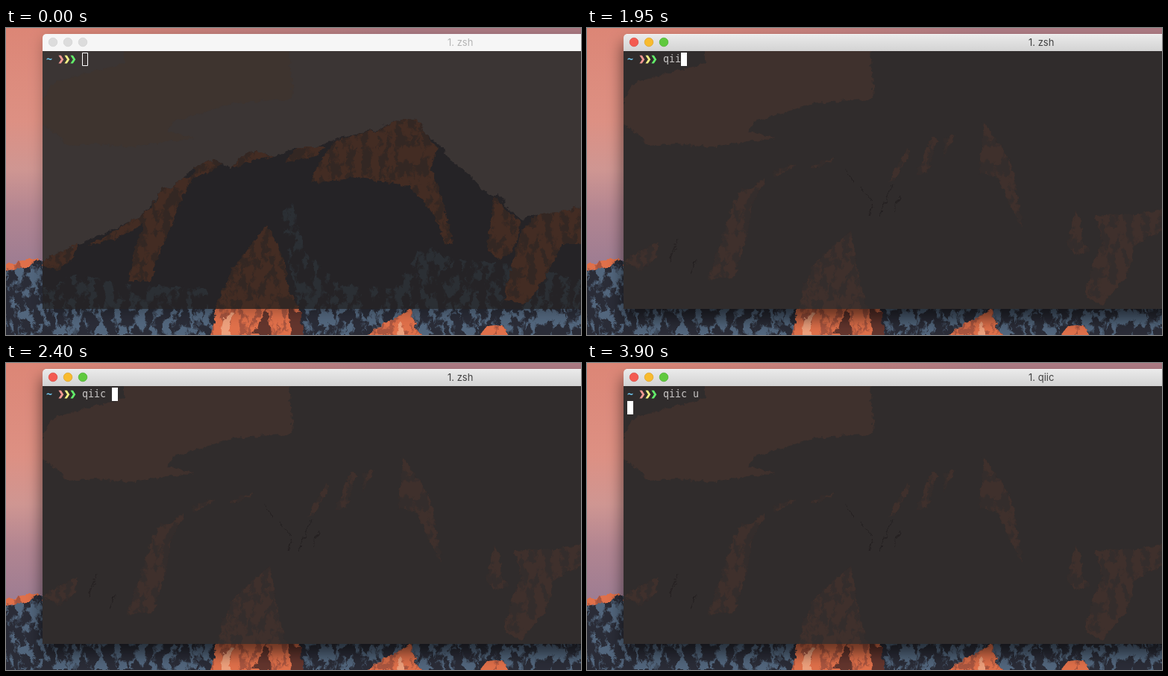
These frames come from a looping animation (771x412 px, 8 s). An HTML page:

```html
<!DOCTYPE html>
<html lang="en">
<head>
<meta charset="utf-8">
<title>Terminal</title>
<style>
  html, body { margin: 0; width: 100%; height: 100%; overflow: hidden; background: #a77c84; }
  svg { display: block; width: 771px; height: 412px; }
  .mono { font: 13.29px "DejaVu Sans Mono", monospace; white-space: pre; }
  .title { font: 13px Inter, sans-serif; }
  .chevron { stroke: currentColor; fill: currentColor; stroke-width: 1; }
  .rock { filter: url(#rough); }
  .flecks { filter: url(#flecks); }
  .focused .idle, .blurred .active { display: none; }
</style>
</head>
<body>
<svg id="stage" class="blurred" viewBox="0 0 771 412">
  <defs>
    <linearGradient id="sky" x2="0" y2="1">
      <stop offset="0" stop-color="#dc8676"/>
      <stop offset=".3" stop-color="#dd9083"/>
      <stop offset=".46" stop-color="#cf9692"/>
      <stop offset=".6" stop-color="#b28591"/>
      <stop offset=".78" stop-color="#9c7c92"/>
    </linearGradient>
    <linearGradient id="dusk">
      <stop offset=".1" stop-color="#ad7b84" stop-opacity="0"/>
      <stop offset=".7" stop-color="#ad7b84"/>
    </linearGradient>
    <linearGradient id="bar" x2="0" y2="1">
      <stop offset="0" stop-color="#ebebeb"/>
      <stop offset="1" stop-color="#d3d3d3"/>
    </linearGradient>
    <filter id="rough" filterUnits="userSpaceOnUse" x="0" y="0" width="771" height="412" color-interpolation-filters="sRGB">
      <feTurbulence type="fractalNoise" baseFrequency=".12" numOctaves="3" seed="4"/>
      <feDisplacementMap in="SourceGraphic" scale="9" xChannelSelector="R" yChannelSelector="G"/>
    </filter>
    <filter id="flecks" filterUnits="userSpaceOnUse" x="0" y="0" width="771" height="412" color-interpolation-filters="sRGB">
      <feTurbulence type="fractalNoise" baseFrequency=".09 .05" numOctaves="4" seed="9"/>
      <feColorMatrix values="0 0 0 0 0  0 0 0 0 0  0 0 0 0 0  9 0 0 0 -4.3"/>
      <feComposite in="SourceGraphic" operator="in"/>
    </filter>
    <filter id="blur" filterUnits="userSpaceOnUse" x="-60" y="-60" width="960" height="560">
      <feGaussianBlur stdDeviation="10"/>
    </filter>
    <clipPath id="screen"><path d="M49 31H771V377H49Z"/></clipPath>

    <path id="ridge" d="M-9 322L10 325 25 312 49 312 75 300 110 285 150 268 175 255 195 240 210 212
      220 215 238 202 252 187 280 175 302 190 320 168 335 166 360 172 390 160 412 162 440 150
      470 142 500 135 525 124 540 121 552 124 565 145 580 155 600 180 625 200 645 224 660 224
      672 240 690 258 712 250 720 260 740 247 780 239V421H-9Z"/>
    <path id="slopes" d="M368 250L385 235 400 300 450 345 520 350 560 290 600 310 690 320 780 340V421H400Z
      M60 350L90 330 160 345 270 350 270 421H-9V340Z"/>
    <g id="faces">
      <path d="M540 121L552 124 565 145 578 160 570 190 585 230 600 290 590 290 575 255 560 232
        540 212 500 205 470 200 440 205 410 207 420 180 440 152 470 143 500 136 525 124Z"/>
      <path d="M210 212L220 215 238 202 252 198 235 230 222 265 200 315 195 340 165 340 172 300 185 262 150 282 110 292 150 270 195 242Z"/>
      <path d="M252 187L280 175 290 183 270 196 252 200Z M302 190L320 168 335 166 360 172 330 178Z
        M390 160L428 160 415 172 375 180Z"/>
      <path d="M350 265L362 285 375 320 378 350 395 380 395 421H275L282 370 300 330 325 295Z"/>
      <path d="M655 225L672 245 690 262 680 300 660 310 645 298Z
        M690 275L712 250 740 247 780 239V290L745 290 725 330 700 370 668 365 680 310Z"/>
      <path d="M49 312L75 300 97 288 90 310 70 325 50 320Z M-9 321L25 311 46 311 28 321-9 327Z"/>
      <path d="M543 377L548 400 562 421H470L505 398Z M628 421L645 400 665 398 678 421Z"/>
    </g>
    <g id="glow">
      <path d="M158 22H380L384 95 340 98 300 102 250 118 225 125 215 138 255 148 160 160 120 155 85 158 65 140 40 122 60 75 110 60 158 48Z"/>
    </g>
    <g id="highlights">
      <path d="M532 126L548 150 568 178 574 210 584 268 570 245 552 200 525 196Z
        M462 146L470 148 455 195 442 197Z M480 148L494 143 478 172Z M430 160L434 165 412 205 406 205Z"/>
      <path d="M208 214L214 218 240 202 222 235 212 290 196 335 162 338 175 300 195 240Z
        M250 192L280 182 272 190 252 200Z M300 188L332 172 325 180 304 190Z"/>
      <path d="M352 274L358 292 362 325 378 385H284L290 345 310 310Z M96 287L92 310 72 326 49 312Z"/>
      <path d="M655 245L662 260 664 285 672 300 655 305 645 290Z
        M680 252L712 250 740 250 780 240V268L735 290 725 330 690 372 668 360 680 310 692 290Z"/>
    </g>
  </defs>

  <!-- Wallpaper -->
  <path fill="url(#sky)" d="M0 0H771V412H0Z"/>
  <path fill="url(#dusk)" d="M0 0H771V60H0Z"/>
  <g class="rock">
    <use href="#ridge" fill="#2a2c37"/>
    <g class="flecks" fill="#52667d"><use href="#ridge"/></g>
    <use href="#faces" fill="#e0704a"/>
    <g class="flecks" fill="#a9553f"><use href="#faces"/></g>
    <path fill="#eda07c" d="M285 421L292 390 304 382 298 421Z M520 421L530 392 537 421Z"/>
    <path fill="#63352d" d="M330 412L350 376 356 412Z M378 374L397 382 398 421H384Z"/>
  </g>
  <g filter="url(#blur)">
    <path class="idle" d="M51 14H830V381H51Z" opacity=".3"/>
    <path class="active" d="M48 20H830V390H48Z" opacity=".55"/>
  </g>

  <!-- Unfocused window -->
  <g class="idle">
    <path fill="#f6f6f6" d="M49 31V13a5 5 0 0 1 5-5H771V31Z"/>
    <g fill="#dcdcdc" stroke="#cfcfcf" stroke-width=".6">
      <circle cx="63" cy="19" r="5.8"/><circle cx="83" cy="19" r="5.8"/><circle cx="103" cy="19" r="5.8"/>
    </g>
    <g clip-path="url(#screen)">
      <path fill="#3b3534" d="M49 30H771V377H49Z"/>
      <g class="rock">
        <use href="#glow" fill="#3e342f"/>
        <use href="#ridge" fill="#252326"/>
        <g class="flecks" fill="#2b2f34"><use href="#slopes"/></g>
        <use href="#faces" fill="#432c23"/>
        <g class="flecks" fill="#332723"><use href="#faces"/></g>
      </g>
    </g>
  </g>

  <!-- Focused window -->
  <g class="active">
    <path fill="url(#bar)" d="M49 31V13a5 5 0 0 1 5-5H771V31Z"/>
    <path fill="#f5f5f5" d="M53 8H771V9H53Z"/>
    <g stroke-width=".7">
      <circle cx="63" cy="19" r="5.8" fill="#f35b51" stroke="#d9483f"/>
      <circle cx="83" cy="19" r="5.8" fill="#f8bb2e" stroke="#dc9f24"/>
      <circle cx="103" cy="19" r="5.8" fill="#60c93e" stroke="#49ad2d"/>
    </g>
    <g clip-path="url(#screen)">
      <path fill="#302c2c" d="M49 30H771V377H49Z"/>
      <g class="rock">
        <use href="#glow" fill="#3f312d"/>
        <use href="#highlights" fill="#3f302c"/>
        <g class="flecks" fill="#342d2c"><use href="#highlights"/></g>
      </g>
      <path class="rock" fill="none" stroke="#231f20"
        d="M345 190l12 18M366 212l16 20M384 236l-6 18M410 210l-18 44M420 224l-9 20M120 285l-10 30M146 310l-8 20"/>
    </g>
  </g>

  <!-- Text -->
  <text id="title" class="title" x="592" y="24"></text>
  <g class="mono">
    <text x="54" y="46" fill="#70c9f2" font-weight="bold">~</text>
    <g class="chevron" font-weight="bold">
      <text x="70" y="46" color="#f49a94">❯</text>
      <text x="78" y="46" color="#f5f486">❯</text>
      <text x="86" y="46" color="#63f06b">❯</text>
    </g>
    <text id="command" x="102" y="46" fill="#c9c7c6"></text>
  </g>
  <path class="idle" d="M102.5 33.5h7v17h-7Z" fill="none" stroke="#fff"/>
  <rect id="cursor" class="active" width="8" height="18" fill="#fff"/>
</svg>
<script>
  const LOOP = 8000, FOCUS = 1050, ENTER = 3600, RUN = 3900;
  const CELL = 8, LINE = 18;
  const typing = [[0, ""], [1650, "q"], [1950, "qii"], [2250, "qiic"], [2400, "qiic "], [2850, "qiic u"]];
  const [stage, title, command, cursor] =
    ["stage", "title", "command", "cursor"].map(id => document.getElementById(id));

  // Inherited fill and stroke colours resolve on the group, so set them on each glyph.
  for (const glyph of document.querySelectorAll(".chevron text")) {
    const color = glyph.getAttribute("color");
    glyph.setAttribute("fill", color);
    glyph.setAttribute("stroke", color);
  }

  function draw(time) {
    const focused = time >= FOCUS, entered = time >= ENTER;
    const typed = typing.findLast(([start]) => time >= start)[1];
    stage.setAttribute("class", focused ? "focused" : "blurred");
    title.textContent = time >= RUN ? "1. qiic" : "1. zsh";
    title.setAttribute("fill", focused ? "#404040" : "#b4b4b4");
    command.textContent = typed;
    cursor.setAttribute("x", entered ? 54 : 102 + typed.length * CELL);
    cursor.setAttribute("y", entered ? 33 + LINE : 33);
  }

  const origin = performance.now();
  function tick() {
    draw((performance.now() - origin) % LOOP);
    requestAnimationFrame(tick);
  }
  tick();
</script>
</body>
</html>
```
